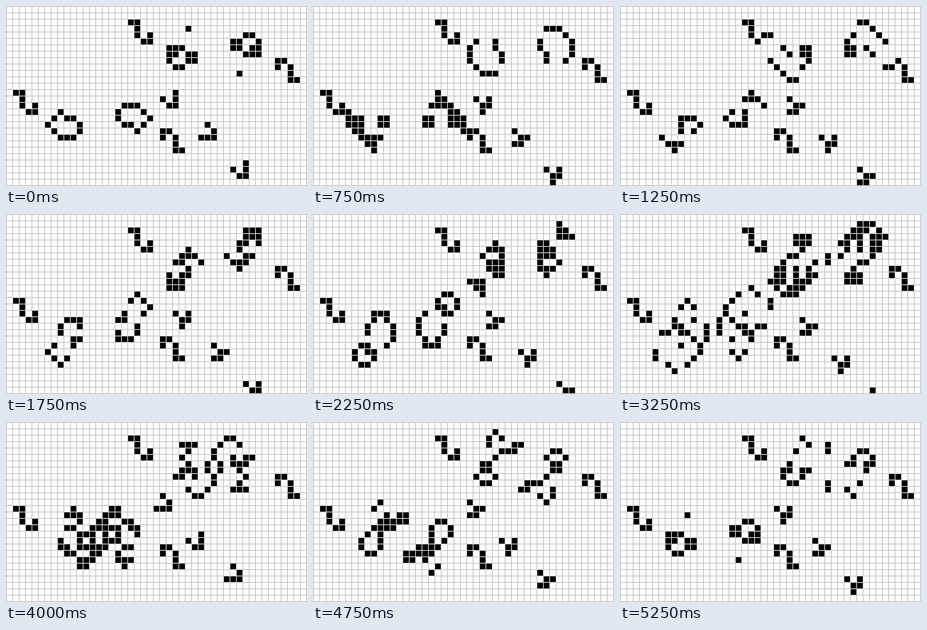
Write a matplotlib script that moves like this. It is 377 px wide and 225 px high and loops after 5500 ms.

```python
import matplotlib.pyplot as plt
import numpy as np
from matplotlib.animation import FuncAnimation

COLS, ROWS, CELL = 47, 28, 8
WIDTH, HEIGHT = COLS * CELL + 1, ROWS * CELL + 1
PERIOD, INTERVAL, DPI = 22, 250, 64
PAD = 12  # hidden margin so that gliders leave the stage freely
WHITE, BLACK, LINE = 255, 0, 198

EATER = ["##..", ".#..", ".#.#", "..##"]
SPARK = ["#"]
UPPER_BEE = ["###..", "##.##", "#..##", ".##.."]
LOWER_BEE = ["..#...", ".#.##.", "#....#", ".#...#", "..###."]
GLIDER = ["..#", "#.#", ".##"]
GLIDER_LATER = [".#.", "..#", "###"]


def cells_of(sprite, x, y):
    return [(x + i, y + j) for j, row in enumerate(sprite)
            for i, char in enumerate(row) if char == "#"]


def with_half_turn(cells, sum_x, sum_y):
    """Add each cell's partner under a 180 degree rotation."""
    return cells + [(sum_x - x, sum_y - y) for x, y in cells]


def starting_grid():
    upper = cells_of(EATER, 19, 2) + cells_of(SPARK, 28, 3) + cells_of(UPPER_BEE, 25, 6)
    lower = cells_of(EATER, 1, 13) + cells_of(LOWER_BEE, 6, 16)
    gliders = (cells_of(GLIDER, 24, 13) + cells_of(GLIDER_LATER, 30, 18)
               + cells_of(GLIDER, 35, 24))
    grid = np.zeros((ROWS + 2 * PAD, COLS + 2 * PAD), dtype=int)
    for x, y in with_half_turn(upper, 64, 13) + with_half_turn(lower, 28, 35) + gliders:
        grid[y + PAD, x + PAD] = 1
    return grid


def step(grid):
    """One generation of Conway's Game of Life."""
    neighbours = sum(np.roll(grid, (dy, dx), (0, 1))
                     for dy in (-1, 0, 1) for dx in (-1, 0, 1) if dx or dy)
    return ((neighbours == 3) | ((neighbours == 2) & (grid == 1))).astype(int)


def render(grid):
    stage = grid[PAD:-PAD, PAD:-PAD]
    image = np.full((HEIGHT, WIDTH), LINE, dtype=np.uint8)
    image[:-1, :-1] = np.kron(np.where(stage, BLACK, WHITE), np.ones((CELL, CELL), dtype=int))
    image[::CELL, :] = LINE
    image[:, ::CELL] = LINE
    return image


generations = [starting_grid()]
while len(generations) < PERIOD:
    generations.append(step(generations[-1]))

fig = plt.figure(figsize=(WIDTH / DPI, HEIGHT / DPI), dpi=DPI)
ax = fig.add_axes([0, 0, 1, 1])
ax.axis("off")
picture = ax.imshow(render(generations[0]), cmap="gray", vmin=0, vmax=255,
                    interpolation="nearest", aspect="auto")


def update(frame):
    picture.set_data(render(generations[frame % PERIOD]))
    return [picture]


anim = FuncAnimation(fig, update, frames=PERIOD, interval=INTERVAL,
                     repeat=True, repeat_delay=0)
plt.show()
```
